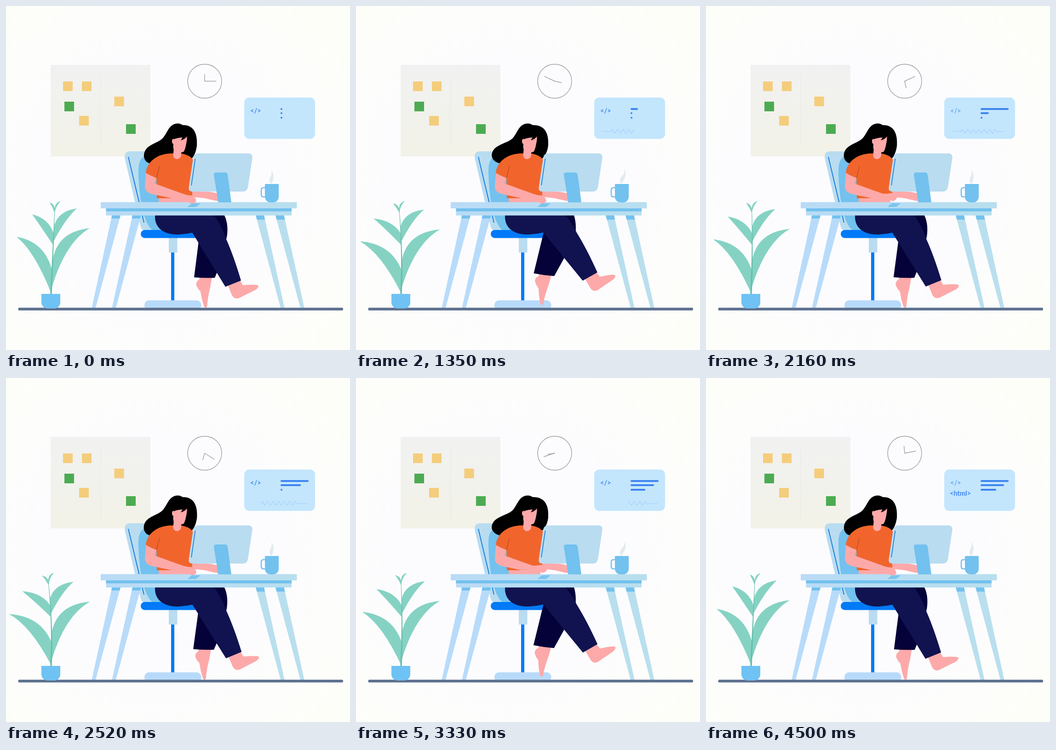
An HTML page with a canvas for the animation above (4.59 s loop, 748x748 px).

```html
<!DOCTYPE html>
<html lang="en">
<head>
<meta charset="utf-8">
<title>At the desk</title>
<style>
html, body { margin: 0; width: 100%; height: 100%; overflow: hidden; background: #fcfcfd; }
canvas { display: block; width: 748px; height: 748px; }
</style>
</head>
<body>
<canvas id="stage" width="748" height="748"></canvas>
<script>
const ctx = document.getElementById('stage').getContext('2d');
const LOOP = 4590, STEP = 90;
const PALE = '#b9dcf0', SKY = '#72c1ee', BLUE = '#007af7', INK = '#3d84f0';
const SKIN = '#fda9a9', NAVY = '#10134f', DARK = '#040238', ORANGE = '#f1652c';

const fill = (color, d) => { ctx.fillStyle = color; ctx.fill(new Path2D(d)); };
const stroke = (color, width, d) => {
  ctx.strokeStyle = color;
  ctx.lineWidth = width;
  ctx.stroke(new Path2D(d));
};
const rect = (color, x, y, w, h, r = 0) => {
  ctx.fillStyle = color;
  ctx.beginPath();
  ctx.roundRect(x, y, w, h, r);
  ctx.fill();
};
const fade = (x0, y0, x1, y1, from, to) => {
  const g = ctx.createLinearGradient(x0, y0, x1, y1);
  g.addColorStop(0, from);
  g.addColorStop(1, to);
  return g;
};
const clamp = v => Math.min(1, Math.max(0, v));
const wave = (t, period) => (1 - Math.cos(2 * Math.PI * t / period)) / 2;
const turned = (x, y, angle, draw) => {
  ctx.save();
  ctx.translate(x, y);
  ctx.rotate(angle);
  ctx.translate(-x, -y);
  draw();
  ctx.restore();
};

function wall() {
  const g = ctx.createRadialGradient(330, 390, 230, 330, 390, 540);
  g.addColorStop(0, '#fcfcff');
  g.addColorStop(1, '#fefef8');
  rect(g, 0, 0, 748, 748);
  rect(fade(0, 128, 0, 327, '#f1f1f1', '#f2f2e8'), 97, 128, 217, 199);
  rect('#eaeae8', 205, 152, 1.2, 153);
  for (const [x, y] of [[124, 164], [165, 164], [235.5, 197], [159, 239]]) rect('#f4cd7c', x, y, 21, 21);
  for (const [x, y] of [[127, 208], [261, 257]]) rect('#4cab52', x, y, 21, 21);
}

function clock(u) {
  ctx.save();
  ctx.translate(432, 163.5);
  ctx.lineCap = 'round';
  stroke('#a2a2a2', 1.4, 'M37 0A37 37 0 1 1 -37 0A37 37 0 1 1 37 0');
  const turn = 0.16 * u * Math.PI / 180;
  ctx.rotate(turn / 2);
  stroke('#a2a2a2', 1.4, 'M0 0V-15');
  ctx.rotate(turn / 2);
  stroke('#a2a2a2', 1.4, 'M0 0H24.5');
  ctx.restore();
}

function panel(t) {
  rect('#c3e6fd', 518, 199, 154, 90, 11);
  ctx.font = 'bold 14.5px Lato, sans-serif';
  ctx.fillStyle = INK;
  const dip = 0.7 * clamp(1 - Math.abs(t - 2250) / 170) + 0.3 * clamp((t - 4410) / 90);
  ctx.globalAlpha = 1 - dip;
  ctx.fillText('</>', 531, 233);
  ctx.globalAlpha = t < 2250
    ? clamp((t - 360) / 180) * clamp((1260 - t) / 180)
    : clamp((t - 3400) / 180);
  ctx.fillText('<html>', 530, 255.5);
  ctx.globalAlpha = 1;

  [[224, 57], [233, 47], [243, 30]].forEach(([y, length], i) => {
    const grown = clamp((t - 1215 - 757 * i) / 640) * length;
    rect(INK, 597, y - 2, 4 + grown, 4, 2);
  });

  // The trace draws itself, then is erased from its start.
  let d = 'M534 272.5H551L554 274';
  for (let i = 0; i < 13; i++) d += `L${557 + 6 * i} ${i % 2 ? 277 : 268}`;
  d += 'L633 274L635 273H656';
  const length = 195;
  const head = length * clamp(t / 2340), tail = length * clamp((t - 2250) / 2340);
  if (head > tail) {
    ctx.save();
    ctx.lineJoin = 'round';
    ctx.setLineDash([0, tail, head - tail, 500]);
    stroke('#a4cdfb', 1.2, d);
    ctx.restore();
  }
}

function plant(bend) {
  const stemX = y => {
    const h = (626 - y) / 183;
    return 98 + 8 * h - 17.5 * h * h * bend;
  };
  // tip, tip shift, upper control, lower control, heights of both joints
  const leaves = [
    [23, 502, -20.5, 14, 84, 512, 62, 533, 575, 624],
    [182, 483, 1, 4, 110, 491, 128, 515, 555, 616],
    [57, 453, -27, 13, 93, 462, 76, 480, 495, 520],
    [154, 440, -9, 4, 112, 446, 128, 464, 480, 513],
    [95, 427, -21, 3, 105, 430, 101, 437, 441, 450],
    [119, 424, -18, -1, 107, 427, 109, 434, 439, 449]
  ];
  for (const [x, y, dx, dy, ax, ay, bx, by, top, low] of leaves) {
    const h = (626 - (top + low) / 2) / 183;
    const mx = (dx - 17.5 * h * h) / 2 * bend, my = dy / 2 * bend;
    fill('#85d2c3', `M${x + dx * bend} ${y + dy * bend}
      Q${ax + mx} ${ay + my} ${stemX(top)} ${top}
      L${stemX(low)} ${low}
      Q${bx + mx} ${by + my} ${x + dx * bend} ${y + dy * bend}Z`);
  }
  let left = '', right = '';
  for (let y = 626; y >= 440; y -= 6) {
    const half = 0.4 + 1.3 * (y - 440) / 186;
    left += `${left ? 'L' : 'M'}${stemX(y) - half} ${y}`;
    right = `L${stemX(y) + half} ${y}` + right;
  }
  fill('#66bdab', left + right + 'Z');
  rect('#6fc2f4', 77, 626, 41, 31.5, [0, 0, 13, 13]);
}

function chair() {
  fill(PALE, 'M270 316H316L340 488H303Q295 488 293 480L258.500 332Q256 316 270 316Z');
  fill(SKY, 'M318 322Q288 323 288 356C288 400 296 470 318 487H345V322Z');
  stroke('#0b78e4', 1.8, 'M266 328L300 471');
  rect(PALE, 354, 500, 18.500, 36);
  rect(BLUE, 359, 536, 7, 105);
  rect('#b8dafa', 301, 640, 123.500, 16, [10, 10, 3, 3]);
  rect(BLUE, 293, 487, 130, 17.500, 8.500);
}

function legs(swing) {
  turned(475, 385, 0.118 * swing, () => {
    fill(SKIN, `M421 588L420 595Q412 599 414 608Q417 615 423 621Q426 640 430 651
      Q433 660 437 654Q439 630 444 612L448 588Z`);
    fill(DARK, 'M421 495L409 590Q432 592 454 591L475 540V490Z');
  });
  const edge = 481.500 - 4 * swing;
  fill(DARK, `M445 450H472Q${edge + 3} 470 ${edge - 1} 500L476 520L440 480Z`);
  fill(NAVY, 'M324 450V460C325 486 347 497 374 497Q392 496 410 492L455 450Z');
  turned(387, 486, -0.142 * swing, () => {
    fill(SKIN, `M482 606L491 628Q496 639 507 635L543 617Q551 611 548 607.500
      Q542 605 515 607L508 595Z`);
    fill(NAVY, 'M387 486L404 491L477 610.500L511 597Q495 543 478 505Q472 484 452 454L400 456Z');
  });
}

function torso(swing) {
  const l = -5 * swing, r = 3 * swing;
  fill('#000', `M373 255.500C355 256 351 275 342 286C330 300 ${303 + l} 300 ${300 + l} 323
    C${299 + l} 335 307 342 314 342L345 335L400 336
    Q${412 + r} 326 ${415 + r} 304C${417 + r} 276 ${407 + r} 258 384 259Q379 255 373 255.500Z`);
  fill(SKIN, 'M332 416H401V429H332Z');
  fill(ORANGE, `M304 363C306 340 328 320 362 320.500L383 321Q399 324 407 334L410 418H328
    L327 374Q314 369 304 363Z`);
  stroke('#a9431d', 1, 'M334 348L327 374');
  fill(SKIN, 'M365 308L363.500 325Q365 333 372 333Q380 332 381 324V310Z');
  fill(SKIN, `M366 288Q360 289 361 295Q361 299 364 300Q362 314 370 317
    Q378 320 386 317Q390 313 393.500 290V283L372 281Z`);
  fill('#000', 'M364 290Q374 286 384 286L380 292Q389 290 394 283L385 274L368 278Z');
  fill(SKIN, 'M405 403L437 403.500Q456 405 462 409L464 425Q448 422 432 418L405 415Z');
}

function table() {
  const leg = (color, top, width, foot, cap) => {
    fill(color, `M${top} 455H${top + width}L${foot + 8.500} 656H${foot}Z`);
    const k = cap / 201;
    fill(SKY, `M${top} 455H${top + width}L${top + width + (foot + 8.5 - top - width) * k} ${455 + cap}
      H${top + (foot - top) * k}Z`);
  };
  leg('#b8dbfa', 230.500, 18.500, 186.500, 7);
  leg('#b8dbfa', 275, 18.500, 230.500, 7);
  leg('#b9dfee', 543, 18, 597, 9.500);
  leg('#b9dfee', 586, 18.500, 640, 9.500);
  const wood = fade(206, 0, 632, 0, '#b9dbf6', '#b8dfee');
  rect(wood, 217.500, 440, 403.500, 15.500);
  rect(SKY, 217.500, 440, 403.500, 6.500);
  rect(wood, 206, 426.500, 426.500, 13.500);
}

function desktop(swing) {
  fill(PALE, `M417 320.500H527Q537 321 535.500 331L526 394Q524 403.500 515 403.500
    H405Q396 403 397.500 394L407 330Q408.500 321 417 320.500Z`);
  stroke('#0b78e4', 1.6, 'M411.500 332L403 390');
  fill(SKY, 'M457 362H476Q481 362 482 367L490 427H461.500L452 368Q451 362 457 362Z');
  fill(SKY, 'M404 429H423L413 437H395Z');
  stroke('#a9d9f4', 0.8, 'M408 429L400 437M413 429L405 437M418 429L410 437');
  rect(SKY, 563, 387, 30, 40, [1, 1, 12, 12]);
  stroke(SKY, 2.6, 'M564 395H560Q555 395 555 400V410Q555 415 560 415H564');
  const s = 9 * swing;
  fill('#e2ebef', `M577 387Q570 380 ${575 + s * 0.3} 371Q${579 + s * 0.6} 364 ${576 + s} 355.500
    Q${584 + s * 0.5} 366 ${581 + s * 0.3} 376Q580 383 577 387Z`);
}

function arm(lift) {
  fill(SKIN, `M304 363Q315 370 327 374L323 386L384 408Q392 414 388 424L318 409
    Q302 405 302 393Z`);
  turned(382, 414, -0.27 * lift, () => {
    fill(SKIN, `M380 406.500Q393 412 404 412L412 418Q415 424 412 427Q407 431 402 429.500
      Q398 427 396 424L382 423Z`);
  });
}

function draw(t) {
  const u = Math.max(0, t - 67);
  const swing = wave(u, 2250);
  const sway = wave(t, 1890);
  const middle = t > 945 && t < 2835;
  const bend = t >= 3780 ? 0 : middle ? 0.22 + 0.78 * sway : sway;
  const lift = t < 4050 ? wave(t, 1350) : 0;

  wall();
  clock(u);
  panel(t);
  chair();
  torso(swing);
  rect('#5f7390', 26.500, 656, 706.500, 6, 2.500);
  legs(swing);
  table();
  desktop(swing);
  arm(lift);
  plant(bend);
}

const start = performance.now();
function tick() {
  const elapsed = (performance.now() - start) % LOOP;
  draw(Math.floor(elapsed / STEP) * STEP);
  requestAnimationFrame(tick);
}
tick();
</script>
</body>
</html>
```
